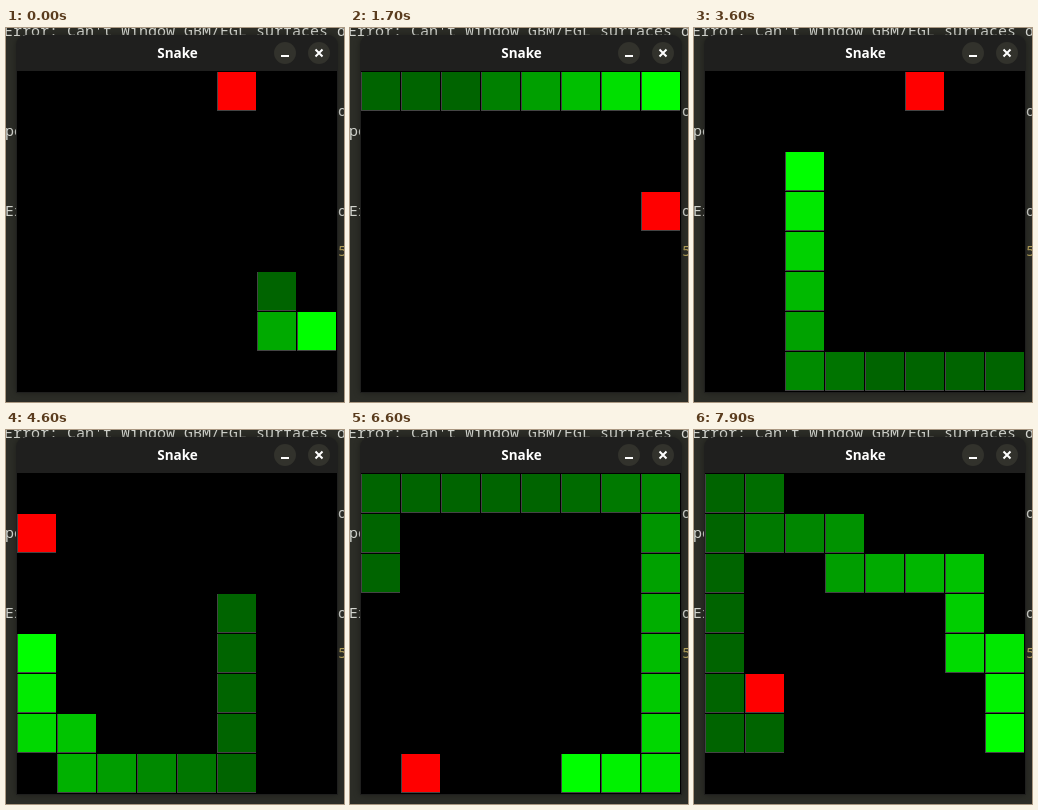
Animation, 338 px wide and 374 px high, one loop 8 s. Source, as an HTML page with a canvas:

```html
<!DOCTYPE html>
<html lang="en">
<head>
<meta charset="utf-8">
<title>Snake</title>
<style>
  html, body { margin: 0; width: 100%; height: 100%; overflow: hidden; background: #2c2d27; }
  canvas { display: block; }
</style>
</head>
<body>
<canvas id="stage" width="338" height="374"></canvas>
<script>
const ctx = document.getElementById('stage').getContext('2d');
const LOOP = 8000, TICK = 100, CELL = 40, LEFT = 11, TOP = 44;

// Head route as direction runs; the first two moves lay out the starting body.
const ROUTE = 'D1R1 U6L4D6L3U6R7 D3L4U3L3D6R7D1L5U5 U2R3D7L4U1L1U2 ' +
  'U4R1D1R1D1R3D3L2U1L3U2 U2R7D7L2 L4U1L1U6R1D1R2D1R3D2R1D2';
const FOODS = '50 33 06 02 40 73 31 25 50 16 01 52 55 14 30 77 17 64 15'
  .split(' ').map(s => [+s[0], +s[1]]);
const STEP = { U: [0, -1], D: [0, 1], L: [-1, 0], R: [1, 0] };
const START_LENGTH = 3;

function buildPath() {
  const path = [[6, 5]];
  for (const [, dir, count] of ROUTE.matchAll(/([UDLR])(\d)/g)) {
    for (let i = 0; i < +count; i++) {
      const [x, y] = path[path.length - 1];
      path.push([x + STEP[dir][0], y + STEP[dir][1]]);
    }
  }
  return path;
}

const path = buildPath();

// Number of foods eaten by the time the head is at each path index.
let eaten = 0;
const eatenAt = path.map(([x, y], i) => {
  const [fx, fy] = FOODS[eaten];
  if (i >= START_LENGTH && x === fx && y === fy) eaten++;
  return eaten;
});

function text(str, x, y, font, color, align = 'left') {
  ctx.font = font;
  ctx.fillStyle = color;
  ctx.textAlign = align;
  ctx.fillText(str, x, y);
}

function disc(x, y, r, color) {
  ctx.fillStyle = color;
  ctx.beginPath();
  ctx.arc(x, y, r, 0, Math.PI * 2);
  ctx.fill();
}

function drawTerminal() {
  ctx.fillStyle = '#2c2d27';
  ctx.fillRect(0, 0, 338, 374);
  const mono = '15px "Noto Sans Mono", monospace', gray = '#d4d6d0';
  text("Error: Can't Window GBM/EGL surfaces d", -2, 8, mono, gray);
  text('po', -1, 108, mono, gray);
  text('Ex', -1, 188, mono, gray);
  text('d', 332, 88, mono, gray);
  text('d', 332, 188, mono, gray);
  text('5', 332, 228, mono, '#b8a45c');
}

function drawWindow() {
  ctx.save();
  ctx.shadowColor = 'rgba(0,0,0,0.35)';
  ctx.shadowBlur = 6;
  ctx.fillStyle = '#1f1f1e';
  ctx.beginPath();
  ctx.roundRect(10, 7, 322, 358, [10, 10, 0, 0]);
  ctx.fill();
  ctx.restore();

  ctx.fillStyle = '#000';
  ctx.fillRect(11, 43, 320, 321);
  text('Snake', 171.5, 30, 'bold 13.5px "Open Sans", sans-serif', '#fff', 'center');

  disc(279, 25, 11, '#32322c');
  disc(313, 25, 11, '#32322c');
  ctx.fillStyle = '#fff';
  ctx.fillRect(275, 27, 8, 2);
  ctx.strokeStyle = '#fff';
  ctx.lineWidth = 2;
  ctx.beginPath();
  ctx.moveTo(309.5, 21.5);
  ctx.lineTo(316.5, 28.5);
  ctx.moveTo(316.5, 21.5);
  ctx.lineTo(309.5, 28.5);
  ctx.stroke();
}

// A cell has a dim line along its left and bottom edges.
function drawCell([x, y], color) {
  const px = LEFT + x * CELL, py = TOP + y * CELL;
  ctx.fillStyle = '#444';
  ctx.fillRect(px, py, CELL - 1, CELL - 1);
  ctx.fillStyle = color;
  ctx.fillRect(px + 1, py, CELL - 2, CELL - 2);
}

function drawGame(time) {
  const tick = Math.max(0, Math.floor(time / TICK) - 1);
  // The game runs slightly slower than two moves per tick.
  const moves = Math.floor(tick * 1.975 + 0.7);
  const head = Math.min(moves + START_LENGTH - 1, path.length - 1);
  const length = START_LENGTH + eatenAt[head];

  drawCell(FOODS[eatenAt[head]], '#f00');
  for (let i = length - 1; i >= 0; i--) {
    const green = Math.max(100, Math.round(255 * (1 - i / length)));
    drawCell(path[head - i], `rgb(0,${green},0)`);
  }
}

function frame() {
  drawTerminal();
  drawWindow();
  drawGame(performance.now() % LOOP);
  requestAnimationFrame(frame);
}
frame();
</script>
</body>
</html>
```
